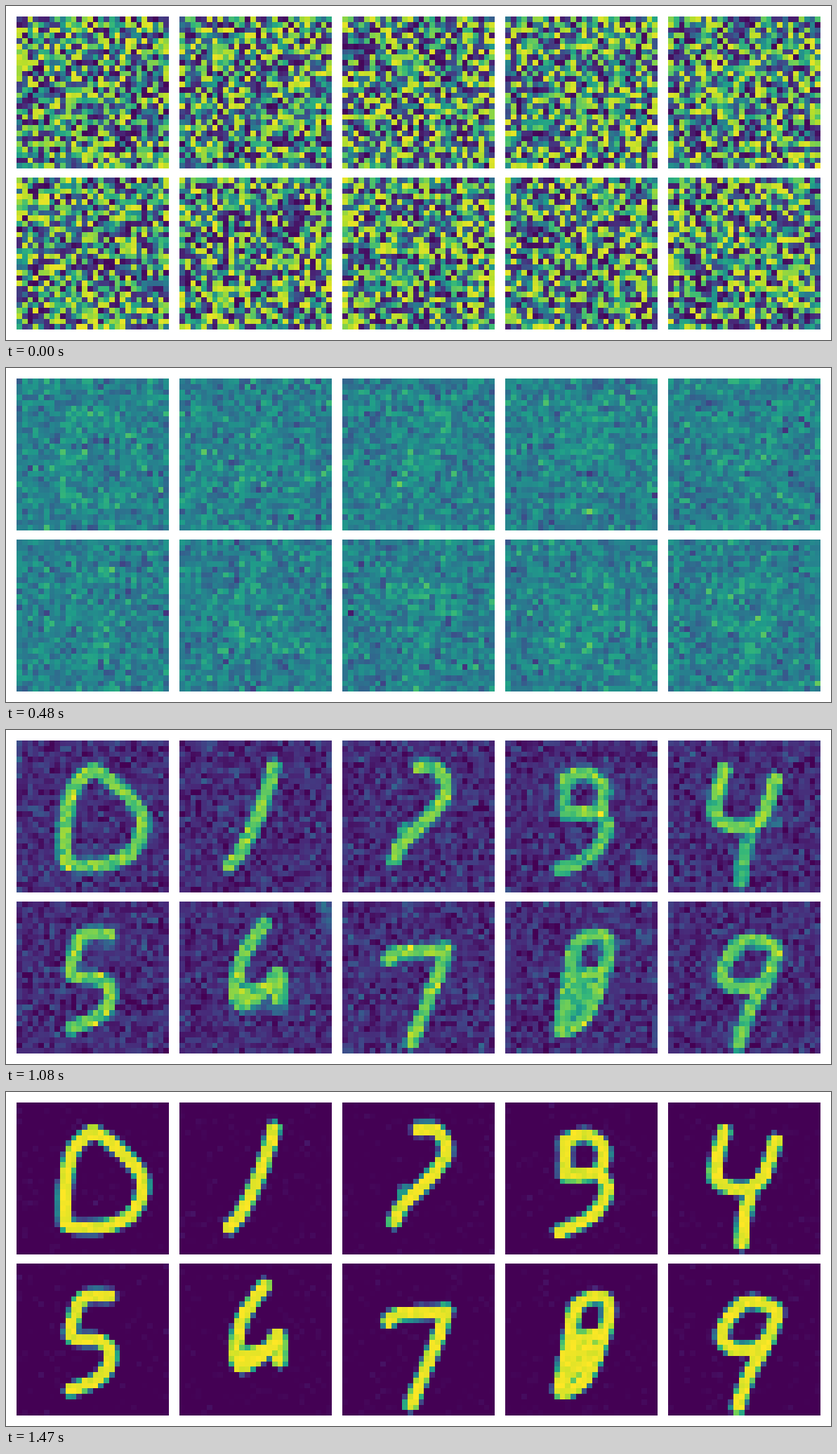
Write an HTML page with a canvas that moves like this. It is 1175 px wide and 477 px high and loops after 1500 ms.

```html
<!DOCTYPE html>
<html lang="en">
<head>
<meta charset="utf-8">
<title>Digits from noise</title>
<style>
html, body { margin: 0; width: 100%; height: 100%; overflow: hidden; background: #fff; }
canvas { display: block; width: 1175px; height: 477px; }
</style>
</head>
<body>
<canvas id="stage" width="1175" height="477"></canvas>
<script>
const ctx = document.getElementById('stage').getContext('2d');
const N = 28, CELL = 7.75, STEP = 30, STEPS = 50;
const clamp = v => Math.min(1, Math.max(0, v));
const mix = (a, b, k) => a + (b - a) * k;
const ramp = (from, to, x) => {
  const k = clamp((x - from) / (to - from));
  return k * k * (3 - 2 * k);
};

// Viridis palette
const stops = ['440154', '482878', '3e4a89', '31688e', '26828e', '1f9e89', '35b779', '6ece58', 'b5de2b', 'fde725']
  .map(h => [0, 2, 4].map(i => parseInt(h.slice(i, i + 2), 16)));
const palette = Array.from({ length: 256 }, (_, i) => {
  const p = i / 255 * 9, k = Math.min(8, Math.floor(p));
  return 'rgb(' + stops[k].map((c, j) => Math.round(mix(c, stops[k + 1][j], p - k))) + ')';
});

// Seeded noise
function rand(a, b) {
  let h = Math.imul(a + 1, 0x9E3779B1) ^ Math.imul(b + 7, 0x85EBCA6B);
  h = Math.imul(h ^ h >>> 16, 0x7FEB352D);
  h = Math.imul(h ^ h >>> 15, 0x846CA68B);
  return ((h ^ h >>> 16) >>> 0) / 4294967296;
}
const gauss = (a, b) =>
  Math.sqrt(-2 * Math.log(rand(a, 2 * b) + 1e-9)) * Math.cos(2 * Math.PI * rand(a, 2 * b + 1));

// Slow part that drifts between knots, plus a fresh part each step
function grain(id, step) {
  const k = Math.floor(step / 10), f = step / 10 - k;
  const slow = ((1 - f) * gauss(id, k) + f * gauss(id, k + 1)) / Math.hypot(f, 1 - f);
  return slow * 0.85 + gauss(id, 100 + step) * 0.53;
}

// Starting noise in -0.5..0.5, a little denser at both ends
function seedNoise(id) {
  const u = rand(id, 999);
  return u - 0.08 * Math.sin(2 * Math.PI * u) - 0.5;
}

// Smooth curve through the key points
function spline(pts) {
  const out = [], at = i => pts[Math.min(pts.length - 1, Math.max(0, i))];
  for (let i = 0; i < pts.length - 1; i++) {
    const [a, b, c, d] = [at(i - 1), at(i), at(i + 1), at(i + 2)];
    for (let t = 0; t < 1; t += 0.125) {
      out.push([0, 1].map(j => b[j] + t / 2 * (c[j] - a[j]
        + t * (2 * a[j] - 5 * b[j] + 4 * c[j] - d[j] + t * (3 * (b[j] - c[j]) + d[j] - a[j])))));
    }
  }
  return [...out, at(pts.length)];
}

// A stroke through points in cells; its strength goes from `early` to `late`
function stroke(path, early = 0.8, late = 1) {
  const line = spline(path.split(' ').map(p => p.split(',').map(Number)));
  const cover = Array.from({ length: N * N }, (_, i) => {
    const x = i % N + 0.5, y = Math.floor(i / N) + 0.5;
    const d = Math.min(...line.map(p => Math.hypot(x - p[0], y - p[1])));
    return clamp((1.75 - d) / 0.85);
  });
  return { cover, early, late };
}

const digits = [
  [stroke('14,5.3 17.5,7.5 22,12 23.2,15.7 21,20.7 16,22.8 10,22.8 8.9,21 9,15 10.5,8.5 14,5.3')],
  [stroke('17.4,4.8 14.8,13 11.5,20 9.2,23')],
  [stroke('14,4.9 17.5,5.3 19,9.5 15,15 11.3,18.5 9.5,22'), stroke('11.4,16.6 13,17', 0.8, 0.6)],
  [
    stroke('11,7 15,6 18,8.5 17.3,12.5 14.5,13.4 11,13.4', 0.7),
    stroke('11,13 11,7', 0.3),
    stroke('17,12.7 18.7,16 16,20.8 10,23.8', 0.5),
    stroke('24.5,21.5 25.5,22', 0.5, 0)
  ],
  [
    stroke('10.3,5.3 8.6,12.5 9.7,15 14,15.9 17.3,14 19.7,7'),
    stroke('15.3,16 14,21 13.5,26', 0.4),
    stroke('18,14.5 20,14.6', 0.6, 0)
  ],
  [stroke('17,6 12.3,6.3 10.5,10 10.3,13.6 15.5,14.3 17.3,17 15.3,21 10,23.3')],
  [
    stroke('15.6,4 11.5,10.3 10.4,16.5 11.7,19 16,16 18.2,13.2 18.4,18'),
    stroke('11,17 16,16'),
    stroke('12,19 18.7,19.3', 0.8, 0),
    stroke('26.8,1 27.4,3.6', 0.5, 0)
  ],
  [stroke('8.5,10.6 10.5,9.4 18.5,8.9 18.5,8.9 18.3,11.5 15.2,19.6 12.6,26')],
  [
    stroke('15.5,6.2 18.3,6.5 18.9,9.5 17.3,15.5 14.5,21.5 10.4,23.7 10.4,21 12.2,11.5 13,8 15.5,6.2', 0.7),
    stroke('12.2,13.7 16.5,13.4'),
    stroke('11.5,21 12.5,15 14.5,20 15.5,14.5', 0.3),
    stroke('25.5,6.5 26.2,6', 0.5, 0)
  ],
  [
    stroke('15.7,7 19.6,8.3 19.6,10.5 17.3,15 13,15.8 10.2,14.5 10.3,11.5 13.2,7.7 15.7,7', 0.7),
    stroke('18.4,14 14.8,20.5 12.8,26.5', 0.6)
  ]
];

const edge = (start, c) => Math.round(start + c * CELL);

function draw(step) {
  const clean = (1 - Math.cos(Math.PI * (step / (STEPS - 1)) ** 1.4)) / 2;
  const ground = mix(0.49, -0.02, clean), ink = mix(0.49, 0.97, clean);
  const first = Math.exp(-step / 4);
  const sd = mix(0.09, 0.022, ramp(28, 49, step)) * (1 - first);
  const formed = ramp(22, 46, step);
  digits.forEach((strokes, d) => {
    const x0 = 15 + d % 5 * 232, y0 = d < 5 ? 15 : 245;
    for (let i = 0; i < N * N; i++) {
      const id = d * N * N + i, c = i % N, r = Math.floor(i / N);
      const cover = Math.max(...strokes.map(s => s.cover[i] * mix(s.early, s.late, formed)));
      const v = mix(ground, ink, cover) + sd * grain(id, step) + 0.96 * first * seedNoise(id);
      ctx.fillStyle = palette[Math.round(clamp(v) * 255)];
      const x = edge(x0, c), y = edge(y0, r);
      ctx.fillRect(x, y, edge(x0, c + 1) - x, edge(y0, r + 1) - y);
    }
  });
}

ctx.fillStyle = '#fff';
ctx.fillRect(0, 0, 1175, 477);
const start = performance.now();
let shown = -1;
function tick() {
  const step = Math.floor((performance.now() - start) / STEP) % STEPS;
  if (step !== shown) draw(shown = step);
  requestAnimationFrame(tick);
}
tick();
</script>
</body>
</html>
```
